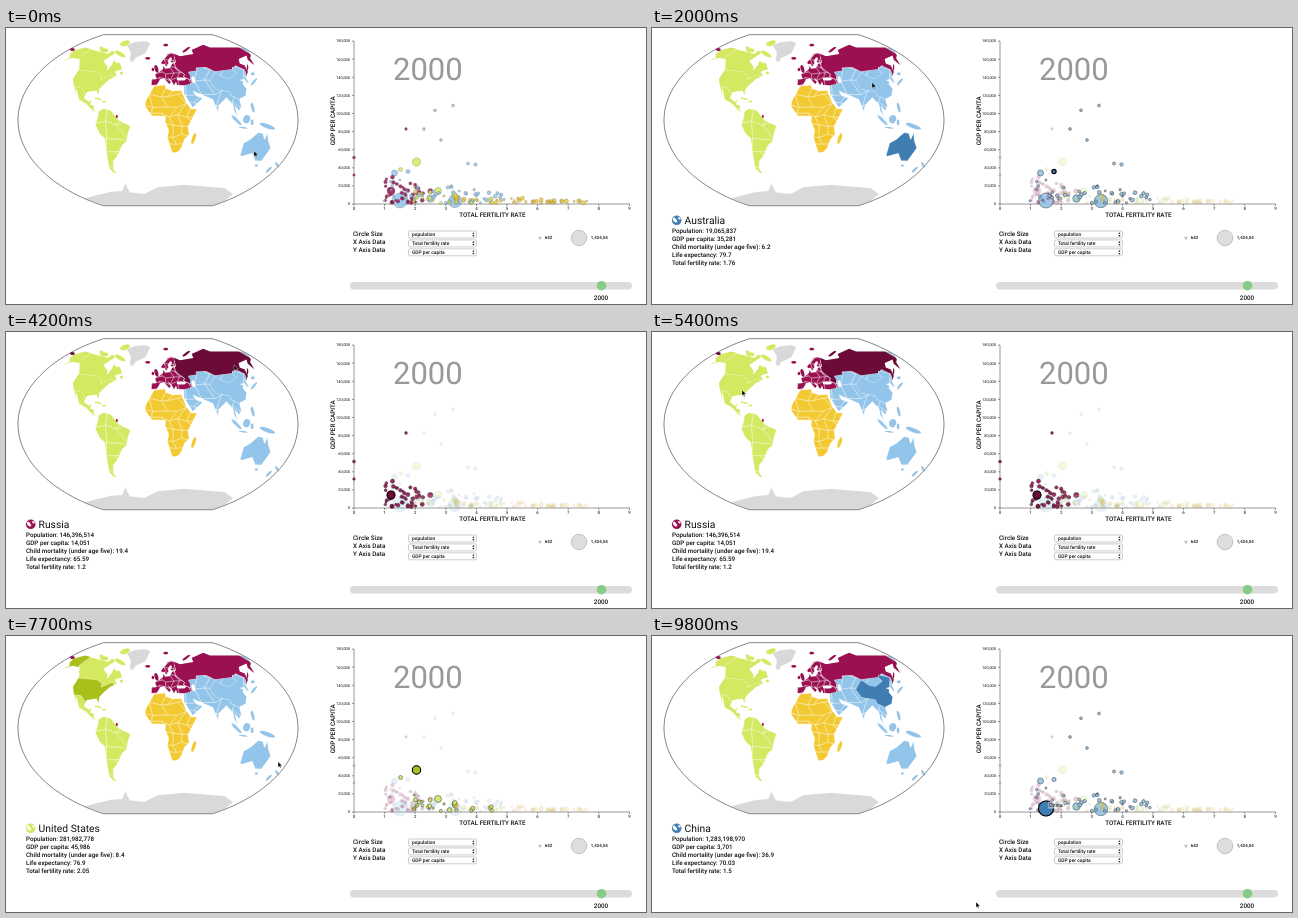
An HTML page that plays this animation: 640 px wide and 276 px high, repeating every 9900 ms.

```html
<!DOCTYPE html>
<html lang="en">
<head>
<meta charset="utf-8">
<title>Fertility and income by country</title>
<style>
html, body { margin: 0; width: 100%; height: 100%; overflow: hidden; background: #fff; }
svg { display: block; width: 640px; height: 276px; font-family: Roboto, Arial, sans-serif; }
text { white-space: pre; text-rendering: geometricPrecision; }
.bold { font-weight: 500; }
.mid { text-anchor: middle; }
.end { text-anchor: end; }
</style>
</head>
<body>
<svg id="stage" viewBox="0 0 640 276"></svg>
<script>
const LOOP = 9900;
const COLOR = { asia: '#93c5ea', europe: '#9a1051', africa: '#f3c932', america: '#d5e862', ice: '#d9d9d9', sea: '#fff' };
const DARK = { asia: '#3f7db3', europe: '#6d0b38', america: '#a9bf1c' };

// Coasts and country zones as a few lon,lat points
const COAST = {
  antarctica: '-180,-90 -180,-77 -140,-75 -100,-73 -75,-73 -60,-65 -60,-75 -30,-77 0,-70 50,-67 130,-67 165,-72 180,-82 180,-90',
  greenland: '-73,78 -60,82 -32,83.5 -18,81 -24,70 -40,65 -43,60 -50,62 -55,71',
  north: '-168,66 -156,71.3 -128,70 -96,68 -94,72 -82,69 -94,60 -82,55 -79,51.5 -77,57 -78,62 -70,59 -65,60 -56,52.5 -66,50 -61,46 -70,42.5 -76,37 -81,31.5 -80,25.5 -84,30 -97,28 -97.8,22 -91,18.7 -87,21.4 -88.5,16 -83.2,15 -83,10 -77.4,8.6 -83.5,8.5 -94,16 -105,20 -112.5,30 -109.5,23 -117,32.5 -124,40 -124,49 -138,59 -152,59.5 -164,54.7 -157,58.7 -165,62',
  south: '-77.4,8.6 -72,12 -62,10.6 -50,0 -35.2,-6 -39,-14 -41,-22 -48,-26 -57,-37 -65,-42 -69,-51 -66,-55 -71,-54.5 -75.5,-49 -71.5,-32 -70.3,-18.5 -76,-14 -81,-5 -77.5,4',
  africa: '-6,35.8 10,37.3 11,33.5 20,31 32,31.2 37.5,18.5 43,12 51,11.8 39,-6.5 40.7,-15 35,-20 32,-29 27,-33.7 20,-34.8 12,-18 13.7,-11 9,-1 9.5,4 -8,4.4 -17,14.5 -16.5,20 -9.7,30',
  eurasia: '-9,43 -1.7,43.4 -4.5,48.3 1.5,50.2 8,53.8 9,57.5 11,54.2 19,54.5 24,59.3 30,60 30,70 41,67 68,68.5 70,73 105,77.7 113,74 140,72.5 180,69 180,65 170,60 163,58 157,51 156,57 163,61 142,59 136,54.5 141,52 138,46 129.5,41 129.5,36 126.5,34.5 125,39.5 118,39 122,37 119.5,35 122,30 117,23.5 108,21 109,13 105,9 100.5,13.5 103.5,1.5 98,10 98,15 91,22.5 80,15 77.5,8 72.5,21 57,26.8 48,30 51,25.5 59.8,22.5 45,13 35,28 36,36.5 27,37 26,40.5 22.5,36.6 19.3,42 13.5,45.5 18.4,40 16,38 8.5,44.3 3,43 -2,36.8 -9,37',
  nordic: '5,61 6,58.5 11,59 13,55.5 18.5,60 17.5,62 22,65.7 25,65 21.5,62 23,60 31,61 31,70 26,71 19,70 13,66',
  australia: '114,-22 122,-18 130,-11.5 136.5,-12 140.5,-17.5 142.5,-11 146,-18.5 153,-25 150,-37.5 140.5,-38 131,-31.5 118,-35 115,-34'
};
const ZONE = {
  mainland: '-130,48.9 -95,49 -83,45 -83,42 -75,45 -69,47.4 -64,44 -78,22 -97,25 -106.5,31.8 -130,32.5',
  alaska: '-175,50 -175,75 -141,75 -141,60 -128,54 -140,52',
  europe: '-12,34 -12,62 28,60 28,56 32,52.5 40,48 38,45 47,43 49,39 44,37 36,36 25,34',
  russia: '28,72 28,56 32,52.5 40,48 38,45 47,42 49,46 47,50 61,51 61,54 77,54 88,49 117,49.7 126,53 135,48 131,42 150,44 180,50 180,80 100,80',
  china: '74,39.5 88,49 97,42.7 105,41.6 119,46 116,49.7 120,52.5 135,48.5 125,39.8 125,20 108,20 98,24 97,28 79,31'
};
// Islands and inland seas: lon, lat, half width, half height, tilt
const ISLES = {
  america: '-110,71,4,2,0 -121,73,2,1.5,0 -73,68.5,6,2,30 -80,80,5,2.5,-20 -56,49,1.6,1.5,0 -79.5,21.7,4,.8,15 -71,19,2,.9,0',
  europe: '-2.5,54,1.8,4,-15 -8,53.3,1.3,1.7,0 -18.5,65,2.6,1.3,0 18,79,2.5,1.3,0 -53,3.8,1,1.4,0',
  africa: '47,-19,1.7,5.5,18',
  asia: '137,36,4.5,1.2,-50 143,43.5,2,1.5,0 123,12,1.4,5,-15 101,0,7,1.5,45 110,-7.3,4.5,.8,8 114,1,3.5,4.2,20 121,-2,1.4,3,0 141,-5.5,8,2.2,20 176,-38.5,1.2,3,-30 170.5,-44,1.2,4,45 147,-42,1.4,1.2,0',
  sea: '34,43,4.5,1.5,0 51.5,42,1.6,3.6,-10'
};

const COUNTRY = {
  australia: { region: 'asia', name: 'Australia', facts: ['19,065,837', '35,281', '6.2', '79.7', '1.76'], dot: [402, 143.5, 2.1] },
  china: { region: 'asia', name: 'China', facts: ['1,283,198,970', '3,701', '36.9', '70.03', '1.5'], dot: [394, 172.5, 7.5] },
  russia: { region: 'europe', name: 'Russia', facts: ['146,396,514', '14,051', '19.4', '65.59', '1.2'], dot: [385, 163, 4] },
  us: { region: 'america', name: 'United States', facts: ['281,982,778', '45,986', '8.4', '76.9', '2.05'], dot: [410.5, 134, 4.2] }
};
const HEADS = ['Population', 'GDP per capita', 'Child mortality (under age five)', 'Life expectancy', 'Total fertility rate'];
const CLICKS = [[0, ''], [400, 'australia'], [2300, 'china'], [4200, 'russia'], [6000, 'us'], [8900, 'china']];
// Cursor moves: start, end, to x, to y
const MOVES = [[1000, 1800, 220, 54.5], [2550, 3200, 228, 33], [4400, 5300, 90, 58], [5400, 5800, 86.5, 55.5],
  [6900, 8300, 392, 171], [8900, 9100, 396, 179], [9100, 9700, 324, 266]];

// Outlying circles; the rest come from CLOUDS
const OUTLIERS = {
  asia: '449,173,6.7 447,77.5,1.4 429,82.3,1.4 435,112,1.4 418,101,1.4 462,135.5,1.5 469.5,136.5,1.7 388.5,145,3 424.5,170.5,3.7',
  europe: '400,101,1.4 348,129.5,1.5 348,147,1.3 424.3,163,2.6',
  america: '394.5,141.5,2 432,163,3.5'
};
// Income falls as fertility rises
const CLOUDS = [
  { region: 'europe', count: 44, from: 379, to: 418, rise: 44, skew: 1.4, size: 2.1 },
  { region: 'asia', count: 44, from: 378, to: 500, rise: 32, skew: 1, size: 2 },
  { region: 'america', count: 26, from: 408, to: 490, rise: 17, skew: 1.8, size: 2.5 },
  { region: 'africa', count: 46, from: 435, to: 585, rise: 8, skew: 0.7, size: 2.2 }
];

const stage = document.getElementById('stage');
function set(node, attrs) {
  for (const k in attrs) node.setAttribute(k, attrs[k]);
}
function add(tag, attrs, parent = stage) {
  const node = document.createElementNS('http://www.w3.org/2000/svg', tag);
  set(node, attrs);
  return parent.appendChild(node);
}
function label(x, y, size, str, cls = '', parent = stage) {
  const node = add('text', { x, y, 'font-size': size, fill: '#111', class: cls }, parent);
  node.textContent = str;
  return node;
}
const tuples = s => s.split(' ').map(p => p.split(',').map(Number));
let seed = 7;
const rand = (a = 0, b = 1) => a + (b - a) * ((seed = seed * 16807 % 2147483647) / 2147483647);

// Winkel tripel projection
function project([lon, lat]) {
  const l = lon * Math.PI / 180, p = lat * Math.PI / 180;
  const a = Math.acos(Math.cos(p) * Math.cos(l / 2));
  const k = a ? Math.sin(a) / a : 1;
  const x = (l * 2 / Math.PI + 2 * Math.cos(p) * Math.sin(l / 2) / k) / 2;
  const y = (p + Math.sin(p) / k) / 2;
  return [152 + 54.45 * x, 92.2 - 54.45 * y];
}

// Irregular brickwork stands for country borders
function borders({ x, y, width, height }, step) {
  const nodes = [];
  for (let r = 0; r <= height / step + 1; r++) {
    nodes.push([]);
    for (let c = 0; c <= width / step + 2; c++)
      nodes[r].push([x + (c - r % 2 / 2 + rand(-0.3, 0.3)) * step, y + (r + rand(-0.3, 0.3)) * step]);
  }
  let d = '';
  nodes.forEach((row, r) => row.forEach((p, c) => {
    if (c) d += `M${row[c - 1]}L${p}`;
    if (r && (r + c) % 5) d += `M${nodes[r - 1][c]}L${p}`;
  }));
  return d;
}

const lands = [];
const line = { fill: 'none', stroke: '#fff', 'stroke-width': 0.5 };
function land(region, points, { id = '', step = 0, parent = stage } = {}) {
  const d = 'M' + tuples(points).map(project).join('L') + 'Z';
  const clip = 'clip' + lands.length;
  add('path', { d }, add('clipPath', { id: clip }, parent));
  const group = add('g', { 'clip-path': `url(#${clip})` }, parent);
  const node = add('path', { d, stroke: '#fff', 'stroke-width': 0.7 }, group);
  lands.push({ region, id, node });
  if (step) add('path', { d: borders(node.getBBox(), step), ...line }, group);
  return group;
}

land('ice', COAST.antarctica);
land('ice', COAST.greenland);
const north = land('america', COAST.north);
land('america', ZONE.mainland, { id: 'us', parent: north });
land('america', ZONE.alaska, { id: 'us', parent: north });
land('america', COAST.south, { step: 15 });
land('africa', COAST.africa, { step: 10 });
const eurasia = land('asia', COAST.eurasia, { step: 12 });
land('europe', ZONE.europe, { step: 6, parent: eurasia });
land('europe', ZONE.russia, { id: 'russia', parent: eurasia });
land('asia', ZONE.china, { id: 'china', parent: eurasia });
land('europe', COAST.nordic, { step: 8 });
land('asia', COAST.australia, { id: 'australia' });

function isle(region, [lon, lat, rx, ry, tilt], id = '') {
  const spot = project([lon, lat]);
  lands.push({ region, id, node: add('ellipse', { rx, ry, transform: `translate(${spot}) rotate(${tilt})` }) });
}
for (const region in ISLES) for (const shape of tuples(ISLES[region])) isle(region, shape);
for (const shape of tuples('59,73.5,4.5,1.2,-35 143,50,.7,3.2,0 -174,67,2.4,1.5,0')) isle('europe', shape, 'russia');

const rim = [];
for (let lat = -90; lat <= 90; lat += 3) {
  rim.push(project([180, lat]));
  rim.unshift(project([-180, lat]));
}
add('path', { d: `M${rim.join('L')}Z`, fill: 'none', stroke: '#333', 'stroke-width': 0.6 });

// Details
const info = add('g', {});
const globe = add('circle', { cx: 24.7, cy: 192.3, r: 4.8 }, info);
add('path', { d: 'M20.6 190.5l1.8-1 1.6 1.4 1.4 2.6-1.4 1.2-2.6-1.6zM25.8 189.2l2.4.4.6 1.6-2 .4z', fill: '#fff' }, info);
const title = label(32.6, 195.5, 10.3, '', '', info);
const rows = HEADS.map((_, i) => label(20, 205.2 + 7.85 * i, 6.25, '', 'bold', info));

// Chart
label(387, 52, 31, '2000').setAttribute('fill', '#999');
let axes = 'M348 13V176H624';
for (let i = 0; i <= 9; i++) {
  const x = 348 + 30.6 * i, y = 176 - 18.1 * i;
  axes += `M346 ${y}h2M${x} 176v2`;
  label(344, y + 1.3, 3.9, (i * 20000).toLocaleString('en-US'), 'end');
  label(x, 182.2, 4.4, i, 'mid');
}
add('path', { d: axes, fill: 'none', stroke: '#333', 'stroke-width': 0.5 });
label(486.4, 189.2, 6.3, 'TOTAL FERTILITY RATE', 'mid bold');
label(0, 0, 6.3, 'GDP PER CAPITA', 'mid bold').setAttribute('transform', 'translate(328.6 92.8) rotate(-90)');

const dots = [];
function dot(region, [x, y, r]) {
  dots.push({ region, x, y, r });
}
for (const id in COUNTRY) dot(COUNTRY[id].region, COUNTRY[id].dot);
for (const region in OUTLIERS) for (const spot of tuples(OUTLIERS[region])) dot(region, spot);
for (const { region, count, from, to, rise, skew, size } of CLOUDS)
  for (let i = 0; i < count; i++) {
    const u = rand() ** skew;
    dot(region, [from + (to - from) * u, 174.8 - rise * (1 - 0.75 * u) * rand() ** 1.3, rand(1, size)]);
  }
dots.sort((a, b) => b.r - a.r);
for (const d of dots) d.node = add('circle', { cx: d.x, cy: d.y, r: d.r, fill: COLOR[d.region] });
const pick = add('circle', { stroke: '#000', 'stroke-width': 1.1 });

// Controls
const CONTROLS = [['Circle Size', 'population'], ['X Axis Data', 'Total fertility rate'], ['Y Axis Data', 'GDP per capita']];
CONTROLS.forEach(([name, value], i) => {
  const y = 203 + 8.9 * i;
  label(347, 207.9 + 8.1 * i, 6.3, name, 'bold');
  add('rect', { x: 402.5, y, width: 68, height: 7, rx: 1.5, fill: '#fff', stroke: '#aaa', 'stroke-width': 0.6 });
  label(406, y + 5.2, 4.9, value, 'bold');
  add('path', { d: `M466.2 ${y + 3}l1.2-1.8 1.2 1.8zm0 1.1l1.2 1.8 1.2-1.8z`, fill: '#333' });
});
const ring = { cy: 210, fill: '#dedede', stroke: '#999', 'stroke-width': 0.5 };
add('circle', { cx: 534, r: 1.2, ...ring });
label(538.8, 211, 4.4, '642', 'bold');
add('circle', { cx: 573, r: 7.8, ...ring });
label(584.8, 211, 4.4, '1,424,54', 'bold');
add('rect', { x: 344, y: 254, width: 282, height: 7.4, rx: 3.7, fill: '#dcdcdc' });
add('circle', { cx: 595.5, cy: 257.7, r: 4.8, fill: '#86cb86' });
label(595, 272, 6.3, '2000', 'mid bold');

const tip = add('g', {});
add('rect', { x: -0.5, y: -5.4, width: 15.5, height: 7, fill: '#fff', 'fill-opacity': 0.5 }, tip);
label(0, 0, 5.5, 'China', '', tip);
const cursor = add('path', { d: 'M0 0V5.6L1.3 4.5 2.1 6.3 3 5.9 2.2 4.2 4 4Z', stroke: '#fff', 'stroke-width': 0.35 });

let shown = null;
function choose(id) {
  if (id === shown) return;
  shown = id;
  const { region, name, facts, dot: spot } = COUNTRY[id] || {};
  for (const l of lands) l.node.setAttribute('fill', (id && l.id === id ? DARK : COLOR)[l.region]);
  for (const d of dots) {
    const same = d.region === region;
    set(d.node, {
      opacity: !id ? 0.85 : same ? 0.9 : 0.22,
      stroke: same ? '#222' : '#666',
      'stroke-width': same ? 0.5 : 0.35
    });
  }
  info.style.display = pick.style.display = id ? '' : 'none';
  if (!id) return;
  globe.setAttribute('fill', region === 'asia' ? DARK.asia : COLOR[region]);
  title.textContent = name;
  rows.forEach((row, i) => { row.textContent = `${HEADS[i]}: ${facts[i]}`; });
  const [cx, cy, r] = spot;
  set(pick, { cx, cy, r, fill: DARK[region] });
}

function pointer(t) {
  let x = 248, y = 123;
  for (const [from, to, nx, ny] of MOVES) {
    const u = Math.min(1, Math.max(0, (t - from) / (to - from)));
    const e = u * u * (3 - 2 * u);
    x += (nx - x) * e;
    y += (ny - y) * e;
  }
  return [x, y];
}

function draw(now) {
  const t = now % LOOP;
  choose(CLICKS.filter(c => c[0] <= t).pop()[1]);
  cursor.setAttribute('transform', `translate(${pointer(t)})`);
  tip.style.display = t < 8250 ? 'none' : '';
  const [x, y] = pointer(Math.min(t, 9100));
  tip.setAttribute('transform', `translate(${x + 0.8} ${y - 8})`);
}
const start = performance.now();
function tick() {
  draw(performance.now() - start);
  requestAnimationFrame(tick);
}
tick();
</script>
</body>
</html>
```
